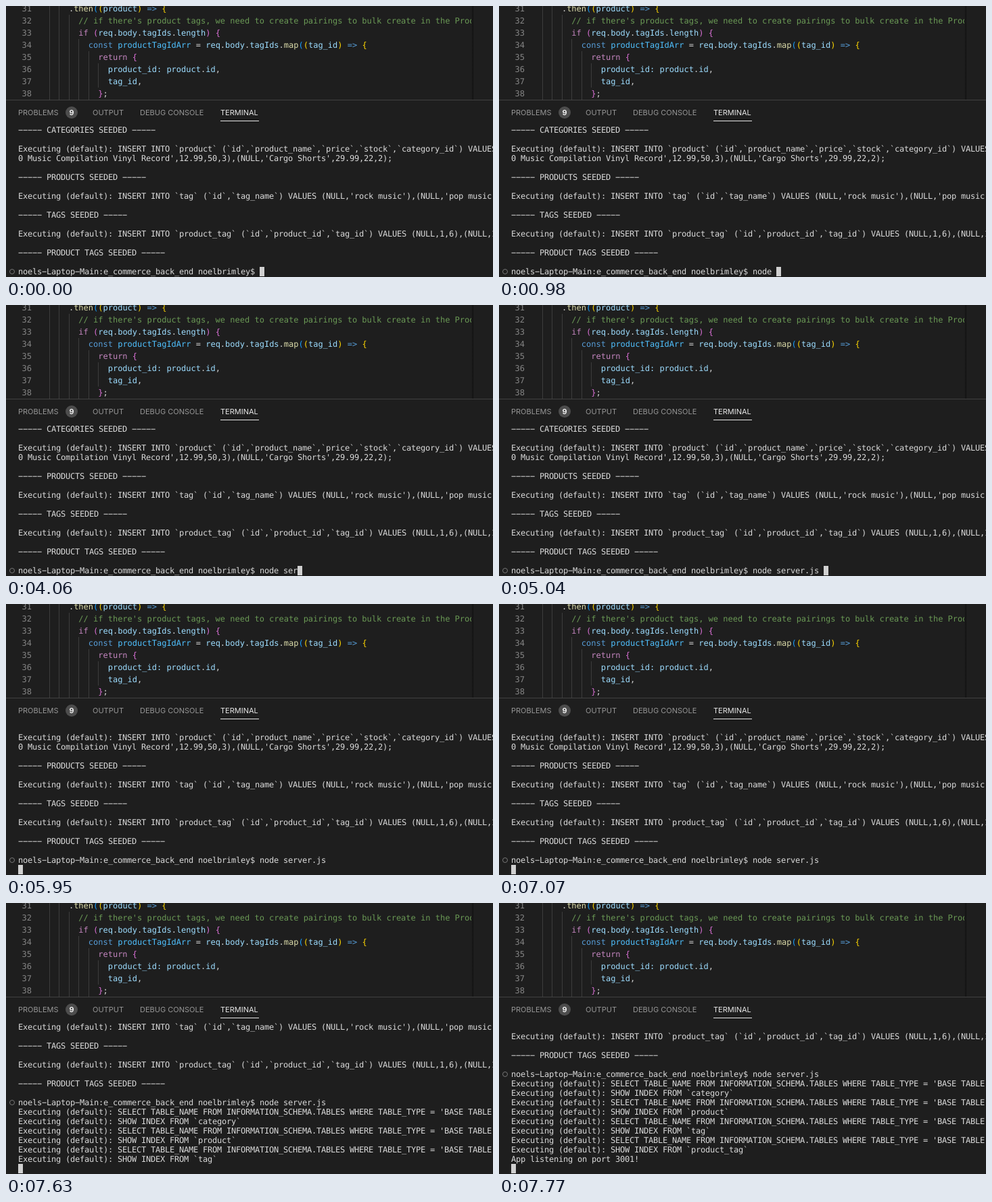
These frames come from a looping animation (720 px wide and 402 px high, 8.05 s). An HTML page:

```html
<!DOCTYPE html>
<html lang="en">
<head>
<meta charset="utf-8">
<title>Terminal session</title>
<style>
  html, body { margin: 0; width: 100%; height: 100%; overflow: hidden; background: #1e1e1e; }
  #stage { position: relative; width: 720px; height: 402px; overflow: hidden; background: #1e1e1e; }
  #stage > *, .guide { position: absolute; }
  pre { margin: 0; font: 12px "DejaVu Sans Mono", monospace; font-variant-ligatures: none; text-rendering: geometricPrecision; }

  #editor { left: 0; top: 0; width: 691px; height: 139px; overflow: hidden; }
  #editor pre { position: absolute; top: -5px; line-height: 18px; color: #d4d4d4; }
  #nums { left: 23.5px; }
  #editor #nums { color: #858585; }
  #code { left: 64px; }
  .guide { width: 1px; background: #3c3c3c; }
  .edge { left: 688px; top: 0; width: 3px; height: 139px; background: linear-gradient(90deg, #1e1e1e, #111); }
  .divider { left: 0; top: 139px; width: 720px; height: 1px; background: #424242; }
  .c { color: #6a9955 } .k { color: #c586c0 } .b { color: #569cd6 } .v { color: #9cdcfe }
  .n { color: #4fc1ff } .f { color: #dcdcaa } .y { color: #ffd700 } .p { color: #da70d6 } .u { color: #179fff }

  .tab { top: 149px; font: 11px/18px Inter, sans-serif; color: #969696; white-space: pre; }
  .active { color: #e7e7e7; }
  .underline { left: 317px; top: 170px; width: 57px; height: 1px; background: #e7e7e7; }
  .badge { left: 88px; top: 149px; width: 18px; height: 18px; border-radius: 50%; background: #4d4d4d;
           font: 600 11px/18px Inter, sans-serif; color: #fff; text-align: center; }

  #term { left: 18px; top: 177px; width: 702px; height: 225px; overflow: hidden; line-height: 14px; color: #dadada; }
  #cursor { top: 387px; width: 7px; height: 14px; background: #d0d0d0; }
  #ring { left: 5px; width: 6px; height: 6px; border: 1px solid #777; border-radius: 50%; }
</style>
</head>
<body>
<div id="stage">
  <div id="editor">
    <pre id="nums"></pre>
    <pre id="code">
    .<span class="f">then</span><span class="u">(</span><span class="y">(</span><span class="v">product</span><span class="y">)</span> <span class="b">=&gt;</span> <span class="y">{</span>
      <span class="c">// if there's product tags, we need to create pairings to bulk create in the ProductTag model</span>
      <span class="k">if</span> <span class="p">(</span><span class="v">req</span>.<span class="v">body</span>.<span class="v">tagIds</span>.<span class="v">length</span><span class="p">)</span> <span class="p">{</span>
        <span class="b">const</span> <span class="n">productTagIdArr</span> = <span class="v">req</span>.<span class="v">body</span>.<span class="v">tagIds</span>.<span class="f">map</span><span class="u">(</span><span class="y">(</span><span class="v">tag_id</span><span class="y">)</span> <span class="b">=&gt;</span> <span class="y">{</span>
          <span class="k">return</span> <span class="p">{</span>
            <span class="v">product_id:</span> <span class="v">product</span>.<span class="v">id</span>,
            <span class="v">tag_id</span>,
          <span class="p">}</span>;</pre>
  </div>
  <div class="edge"></div>
  <div class="divider"></div>
  <div class="tab" style="left:18px">PROBLEMS</div>
  <div class="badge">9</div>
  <div class="tab" style="left:128px">OUTPUT</div>
  <div class="tab" style="left:198px">DEBUG CONSOLE</div>
  <div class="tab active" style="left:317px">TERMINAL</div>
  <div class="underline"></div>
  <pre id="term"></pre>
  <div id="cursor"></div>
  <div id="ring"></div>
</div>
<script>
const LOOP = 8050, ROWS = 16, ROW_H = 14, CELL = 7, LEFT = 18, TOP = 177;
const $ = id => document.getElementById(id);
const run = sql => "Executing (default): " + sql;
const seeded = what => `----- ${what} SEEDED -----`;

const history = [
  seeded("CATEGORIES"), "",
  run("INSERT INTO `product` (`id`,`product_name`,`price`,`stock`,`category_id`) VALUES"),
  "0 Music Compilation Vinyl Record',12.99,50,3),(NULL,'Cargo Shorts',29.99,22,2);", "",
  seeded("PRODUCTS"), "",
  run("INSERT INTO `tag` (`id`,`tag_name`) VALUES (NULL,'rock music'),(NULL,'pop music'),"), "",
  seeded("TAGS"), "",
  run("INSERT INTO `product_tag` (`id`,`product_id`,`tag_id`) VALUES (NULL,1,6),(NULL,1,7)"), "",
  seeded("PRODUCT TAGS"), ""
];
const prompt = "noels-Laptop-Main:e_commerce_back_end noelbrimley$ ";
const output = ["category", "product", "tag", "product_tag"].flatMap(table => [
  run("SELECT TABLE_NAME FROM INFORMATION_SCHEMA.TABLES WHERE TABLE_TYPE = 'BASE TABLE' AND"),
  run("SHOW INDEX FROM `" + table + "`")
]).concat("App listening on port 3001!");

// [time, typed command, printed output lines]; null means Enter is not pressed yet
const steps = [
  [0, "", null], [140, "n", null], [210, "no", null], [350, "nod", null],
  [770, "node", null], [910, "node ", null],
  [3290, "node s", null], [3570, "node se", null], [3640, "node ser", null],
  [4270, "node server.js ", null], [5250, "node server.js ", 0],
  [7490, "node server.js ", 2], [7560, "node server.js ", 4],
  [7630, "node server.js ", 6], [7700, "node server.js ", 8], [7770, "node server.js ", 9]
];

// Snap a monospaced block to an exact cell width
function setPitch(el, pitch) {
  const probe = document.createElement("span");
  probe.textContent = "0".repeat(100);
  probe.style.position = "absolute";
  el.append(probe);
  const natural = probe.getBoundingClientRect().width / 100;
  probe.remove();
  el.style.letterSpacing = (pitch - natural).toFixed(4) + "px";
}

function addGuides() {
  const firstRow = [0, 0, 1, 3, 4, 5];
  firstRow.forEach((row, i) => {
    const guide = document.createElement("div");
    const end = i === 5 ? 7 : 8;
    guide.className = "guide";
    guide.style.left = Math.round(64 + i * 14.45) + "px";
    guide.style.top = row * 18 - 5 + "px";
    guide.style.height = (end - row) * 18 + "px";
    $("editor").prepend(guide);
  });
}

function show([, command, printed]) {
  const lines = [...history, prompt + command];
  if (printed !== null) lines.push(...output.slice(0, printed), "");
  const skipped = lines.length - ROWS;
  // The wide minus glyph gives the terminal's long dashes
  $("term").textContent = lines.slice(skipped).join("\n").replace(/-/g, "\u2212");
  $("cursor").style.left = LEFT + CELL * lines[lines.length - 1].length + "px";
  $("ring").style.top = TOP + (history.length - skipped) * ROW_H + 3 + "px";
}

$("nums").textContent = Array.from({ length: 8 }, (_, i) => 31 + i).join("\n");
setPitch($("nums"), 7.224);
setPitch($("code"), 7.224);
setPitch($("term"), CELL);
addGuides();

const start = performance.now();
let current = null;
function tick() {
  const time = (performance.now() - start) % LOOP;
  const step = steps.findLast(s => s[0] <= time);
  if (step !== current) show(current = step);
  requestAnimationFrame(tick);
}
tick();
</script>
</body>
</html>
```
